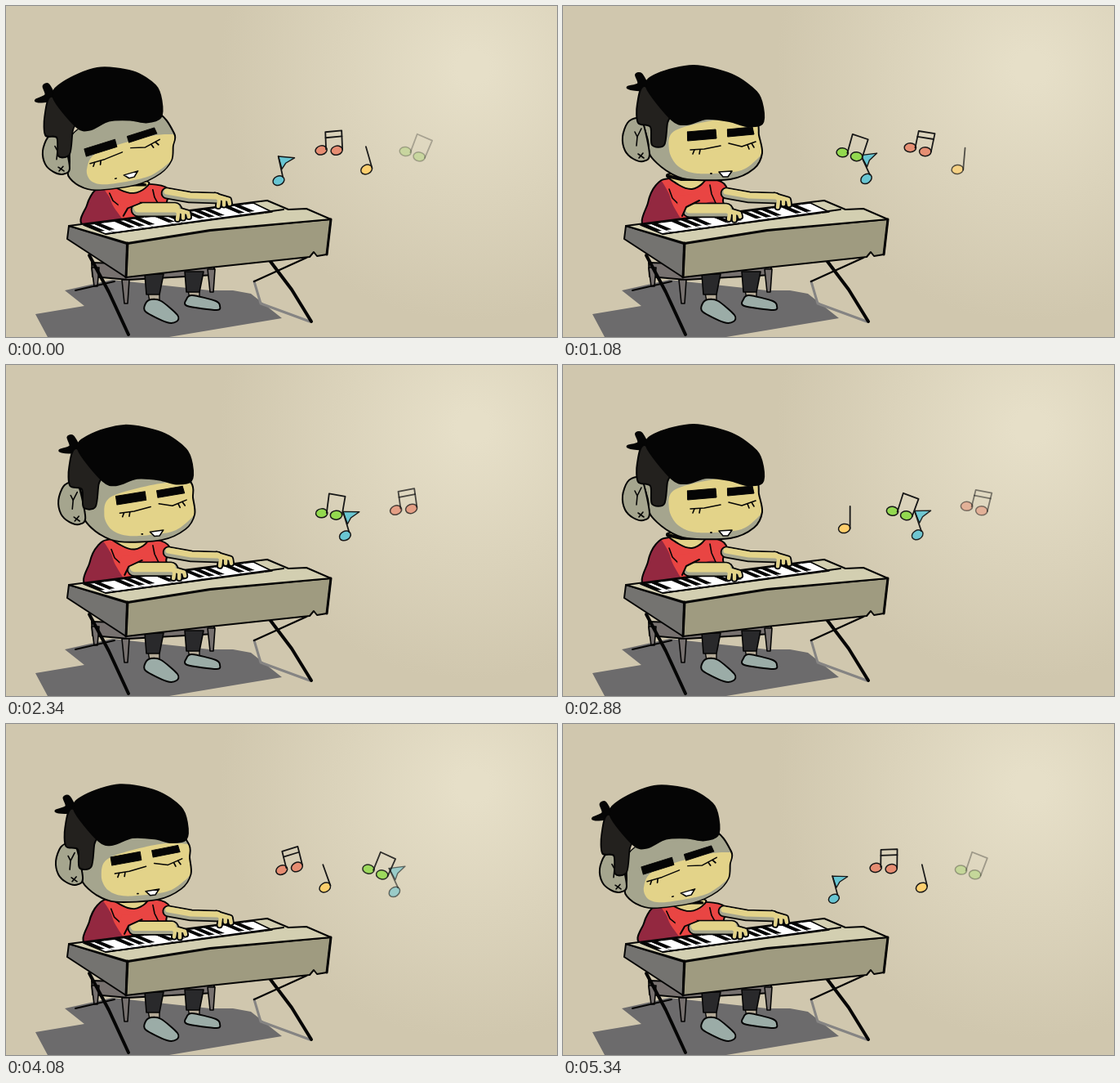
An HTML page with a canvas for the animation above (5.4 s loop, 675x405 px).

```html
<!DOCTYPE html>
<html lang="en">
<head>
<meta charset="utf-8">
<title>Keyboard player</title>
<style>
html, body { margin: 0; width: 100%; height: 100%; overflow: hidden; background: #d0c7ae; }
canvas { display: block; }
</style>
</head>
<body>
<canvas id="stage" width="675" height="405"></canvas>
<script>
const ctx = document.getElementById('stage').getContext('2d');
const LOOP = 5400, STEP = 60, SWAY = 1800, NOTE_LIFE = 5100;
const INK = '#050505', SKIN = '#e3d389', SHADE = '#a5a58e', RED = '#e94543', WINE = '#932840';
const mix = (a, b, k) => a + (b - a) * k;
const smooth = u => u * u * (3 - 2 * u);
const points = s => s.split(' ').map(p => p.split(',').map(Number));

function paint(fill, line, width = 2) {
  if (fill) { ctx.fillStyle = fill; ctx.fill(); }
  if (line) { ctx.strokeStyle = line; ctx.lineWidth = width; ctx.stroke(); }
}
function poly(s, fill, line, width) {
  ctx.beginPath();
  points(s).forEach(p => ctx.lineTo(...p));
  if (fill) ctx.closePath();
  paint(fill, line, width);
}
const stroke = (s, width = 1.6, color = INK) => poly(s, null, color, width);

// Closed smooth shape through the given points.
function blob(s, fill, line = INK, width = 2) {
  const p = points(s), n = p.length, T = 0.15;
  ctx.beginPath();
  ctx.moveTo(...p[0]);
  p.forEach((b, i) => {
    const a = p[(i + n - 1) % n], c = p[(i + 1) % n], d = p[(i + 2) % n];
    ctx.bezierCurveTo(b[0] + (c[0] - a[0]) * T, b[1] + (c[1] - a[1]) * T,
      c[0] - (d[0] - b[0]) * T, c[1] - (d[1] - b[1]) * T, ...c);
  });
  paint(fill, line, width);
}
function clipped(s, fill, details) {
  ctx.save();
  blob(s, fill, null);
  ctx.clip();
  details();
  ctx.restore();
  blob(s, null);
}

// Parts are drawn leaning forward (1); at 0 their centre and shape take the backward pose.
let lean = 0;
function posed([x, y], [backX, backY], [a, b, c, d], drawPart) {
  ctx.save();
  ctx.translate(mix(backX, x, lean), mix(backY, y, lean));
  ctx.transform(mix(a, 1, lean), mix(b, 0, lean), mix(c, 0, lean), mix(d, 1, lean), 0, 0);
  ctx.translate(-x, -y);
  drawPart();
  ctx.restore();
}
function leanAt(t) {
  const p = t % SWAY;
  if (p < 180) return -0.25 * smooth(p / 180);
  if (p < 900) return mix(1, -0.25, ((900 - p) / 720) ** 2);
  if (p < 1110) return 1;
  return p < 1740 ? 1 - smooth((p - 1110) / 630) : 0;
}

function background() {
  const g = ctx.createRadialGradient(572, 75, 20, 572, 75, 310);
  g.addColorStop(0, '#e6dfc8');
  g.addColorStop(1, '#d0c7ae');
  ctx.fillStyle = g;
  ctx.fillRect(0, 0, 675, 405);
}

function floor() {
  poly('36,377 96,367 72,348 130,335 250,348 278,348 300,352 338,382 200,405 51,405', '#6c6b6c');
  const wood = '#77716f';
  poly('105,314 255,319 255,329 150,335 106,331', wood, INK);
  for (const [x, y, h] of [[105, 320, 23], [142, 335, 29], [247, 322, 28]])
    poly(`${x},${y} ${x + 3},${y + h} ${x + 7},${y + h} ${x + 9},${y}`, wood, INK, 1.6);
  for (const [x, y] of [[170, 328], [219, 325]]) {
    poly(`${x + 4},${y + 22} ${x + 18},${y + 22} ${x + 18},${y + 34} ${x + 6},${y + 34}`, '#b3a996', INK, 1.4);
    poly(`${x},${y} ${x + 23},${y} ${x + 18},${y + 25} ${x + 2},${y + 25}`, '#29292b', INK, 1.6);
  }
  blob('171,364 178,359 190,361 210,378 209,386 197,387 171,374', '#9baca7');
  blob('221,359 228,354 257,361 262,367 258,372 222,367', '#9baca7');
  stroke('304,337 312,364 372,386', 3, '#858483');
  stroke('85,348 133,337', 2);
  stroke('368,308 304,337', 2.4);
  stroke('102,305 126,350 150,402', 4);
  stroke('322,310 350,347 374,386', 4);
}

function torso() {
  clipped('103,272 104,241 114,219 130,211 184,212 200,221 196,238 198,270', RED, () => {
    blob('96,285 96,215 116,210 129,228 134,242 152,285', WINE, null);
    blob('168,262 172,243 188,241 190,262', WINE, null);
  });
  blob('128,206 142,219 158,224 171,217 173,207', SKIN);
  stroke('128,208 145,212 171,212', 4);
  stroke('130,224 134,235 147,248');
  stroke('180,219 182,230 187,241');
}

function face() {
  clipped('95,118 104,165 107,183 126,201 152,212 205,212 234,199 244,180 240,158 236,138 200,100 130,100', SHADE, () =>
    blob('130,176 138,152 205,137 250,145 248,172 236,189 215,202 165,205 141,196', SKIN, null));
}
function features() {
  poly('152,154 187,151 188,162 153,165', INK, INK, 1);
  poly('201,151 232,148 234,157 202,160', INK, INK, 1);
  stroke('156,176 173,175 193,171');
  stroke('203,168 219,172 236,166');
  for (const [x, y, dx] of [[161, 176, -2], [168, 176, -1], [226, 170, 2], [231, 168, 3]])
    stroke(`${x},${y} ${x + dx},${y + 5}`);
  poly('191,203 207,202 202,209 196,209', '#fff', INK, 1.6);
  stroke('181,205 182,205', 1.8);
}
function ear() {
  blob('73,160 79,143 90,137 98,143 106,182 98,190 86,187 76,177', SHADE);
  stroke('88,154 91,160 96,150');
  stroke('91,160 90,171');
  stroke('92,181 99,186');
  stroke('98,180 93,186');
}
function hair() {
  blob('79,99 92,95 89,84 96,83 104,98 98,103 83,102', INK);
  blob('100,98 91,120 92,143 107,148 109,170 124,170 128,143 133,125', '#23211e');
  blob('102,99 116,83 160,73 207,84 237,105 245,124 244,144 225,147 204,141 176,138 151,145 133,139', INK);
}

function keyboard() {
  poly('77,269 148,291 147,332 75,285', '#747370', INK);
  poly('149,291 250,275 398,261 393,304 381,306 377,301 372,307 250,320 147,332', '#9f9b80', INK);
  poly('77,269 303,240 320,238 346,249 368,248 398,261 250,274 149,290', '#d3cfb1', INK);
  poly('95,268 303,241 326,252 122,279', '#fff', INK, 1.6);
  const count = 17;
  for (let i = 0; i < count; i++) {
    ctx.save();
    ctx.transform(208, -27, 26, 11, 95, 268);
    if (i % 7 != 2 && i % 7 != 6) {
      ctx.fillStyle = INK;
      ctx.fillRect(i / count, 0, 0.036, 0.72);
    }
    ctx.fillRect(i / count, 0, 0.004, 1);
    ctx.restore();
  }
  stroke('122,279 340,249', 1.8);
  stroke('398,261 393,304', 3);
  stroke('149,290 147,332', 3);
}

// An arm is a thick outlined line, its three fingers are thin ones.
function arm(path, width, [x, y], tap) {
  const lines = [[path, width]];
  for (let i = 0; i < 3; i++)
    lines.push([`${x - 5},${y - 3} ${x + i * 6},${y + 2} ${x - 1 + i * 7},${y + 10 - i * 1.5 + (i % 2 ? tap : -tap)}`, 4.5]);
  lines.forEach(([s, w]) => stroke(s, w + 3.6));
  lines.forEach(([s, w]) => stroke(s, w, SHADE));
  ctx.translate(0, -2);
  stroke(path, width - 4, SKIN);
  ctx.translate(0, 2);
  lines.slice(1).forEach(([s, w]) => stroke(s, w - 0.5, SKIN));
}
function arms(t) {
  const tap = 1.2 * Math.sin(t / 300 * Math.PI), back = 1 - lean;
  ctx.save();
  ctx.translate(-3 * back, 0);
  arm('200,229 228,234 260,235', 11, [264, 235], tap);
  ctx.translate(10 * back, -back);
  arm('155,250 175,250 200,250', 15, [204, 252], -tap);
  ctx.restore();
}
function sleeve() {
  poly('147,256 151,246 166,239 160,230 143,232 140,242', RED);
  stroke('146,257 151,246 167,238', 2);
}

// Pairs of notes are placed by their middle, single notes by their head.
const notes = [
  { color: '#68c5d2', birth: 5200, x: 327, y: 214, speed: 0.0348, rise: 0.002, swing: [-12, 13, 1500, 2080],
    heads: [[0, 0]], lines: ['6,-3 6,-29'], flag: '6,-29 25,-23 13,-19 7,-13' },
  { color: '#e68d72', birth: 3880, x: 339, y: 165, speed: 0.0386, rise: 0, swing: [0, 14, 1700, 1050],
    heads: [[-12, 11], [7, 12]], lines: ['-6,10 -6,-11 14,-12 14,11', '-6,-4 14,-5'] },
  { color: '#ffcf6c', birth: 2500, x: 330, y: 200, speed: 0.0385, rise: 0, swing: [-8, 13, 1680, 2300],
    heads: [[0, 0]], lines: ['7,0 7,-27'] },
  { color: '#93d94f', birth: 640, x: 342, y: 171, speed: 0.0342, rise: 0, swing: [8, 14, 1400, 4860],
    heads: [[-12, 12], [6, 12]], lines: ['-6,11 -6,-13 14,-12 13,11'] }
];
function drawNote({ color, birth, x, y, speed, rise, swing, heads, lines, flag }, t) {
  const age = (t - birth + LOOP) % LOOP;
  if (age > NOTE_LIFE) return;
  const [middle, reach, period, peak] = swing;
  const tilt = middle + reach * Math.cos((age - peak) / period * 2 * Math.PI);
  const size = Math.min(1, 0.3 + age / 220);
  ctx.save();
  ctx.globalAlpha = 1 - Math.max(0, (age / NOTE_LIFE - 0.35) / 0.65) ** 3;
  ctx.translate(x + speed * age, y - rise * age);
  ctx.rotate(tilt * Math.PI / 180);
  ctx.scale(size, size);
  for (const [hx, hy] of heads) {
    ctx.beginPath();
    ctx.ellipse(hx, hy, 7.2, 5.5, -0.2, 0, 7);
    paint(color, '#161616', 1.5);
  }
  if (flag) poly(flag, color, '#161616', 1.4);
  lines.forEach(l => stroke(l, 1.8, '#161616'));
  ctx.restore();
}

function draw(t) {
  lean = leanAt(t);
  const bodyPose = [[200, 250], [201, 251], [1.06, 0, 0, 0.85]];
  background();
  floor();
  posed(...bodyPose, torso);
  posed([175, 190], [137, 205], [0.92, -0.12, -0.25, 0.8], face);
  posed([88, 165], [60, 182], [1, 0, 0, 0.95], ear);
  posed([167, 110], [118, 113], [0.93, -0.15, 0, 1.03], hair);
  posed([197, 173], [147, 179.5], [1.08, -0.26, 0.13, 0.86], features);
  keyboard();
  arms(t);
  posed(...bodyPose, sleeve);
  notes.forEach(n => drawNote(n, t));
}
ctx.lineJoin = ctx.lineCap = 'round';
const begin = performance.now();
function tick() {
  const t = (performance.now() - begin) % LOOP;
  draw(Math.floor(t / STEP) * STEP);
  requestAnimationFrame(tick);
}
tick();
</script>
</body>
</html>
```
